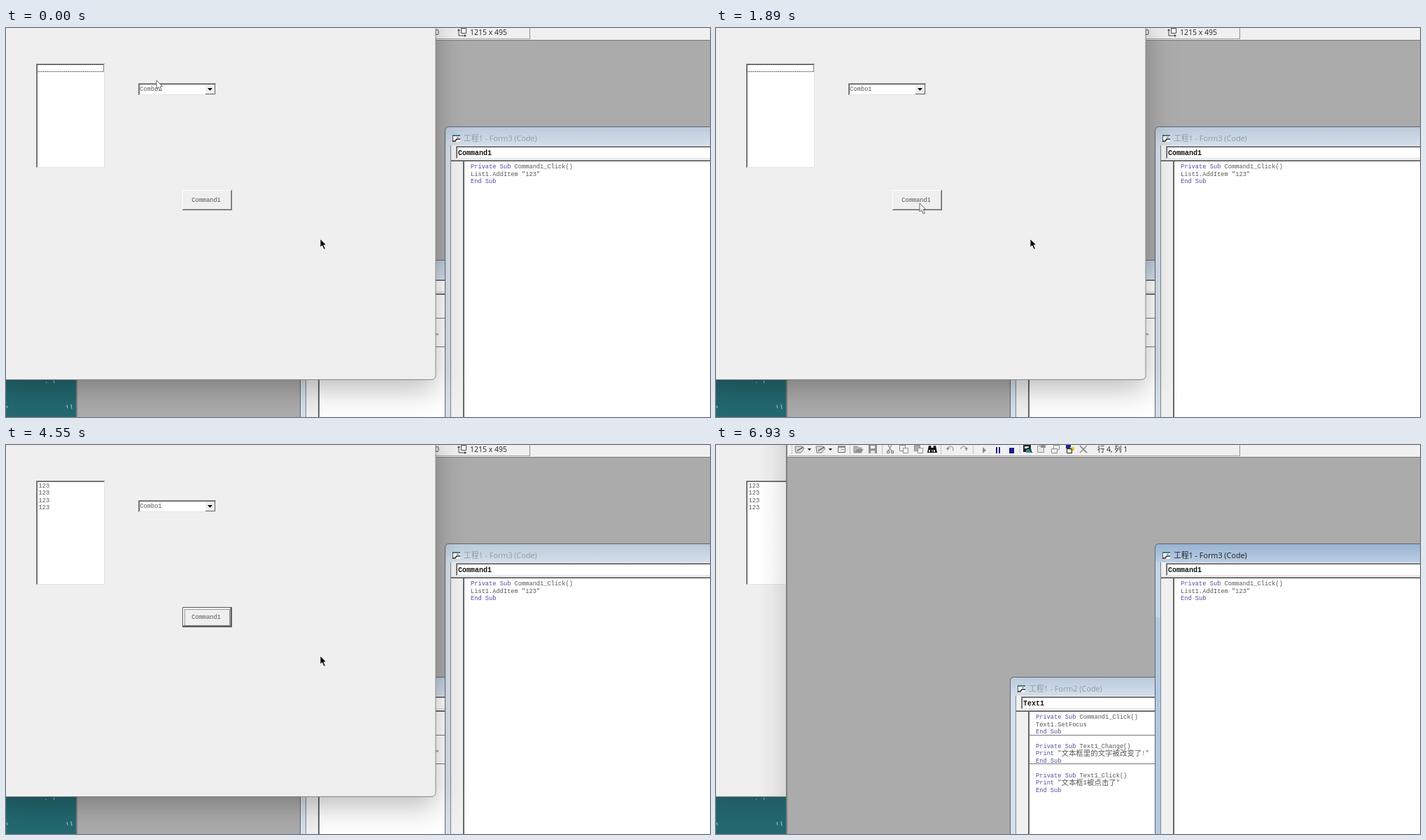
An HTML page with a canvas for the animation above (7 s loop, 1006 by 557 pixels).

```html
<!DOCTYPE html>
<html lang="zh">
<head>
<meta charset="utf-8">
<title>List demo</title>
<style>
  html, body { margin: 0; width: 100%; height: 100%; overflow: hidden; background: #ababab; }
  canvas { display: block; }
</style>
</head>
<body>
<canvas id="stage" width="1006" height="557"></canvas>
<script>
const g = document.getElementById('stage').getContext('2d');
const W = 1006, H = 557, LOOP = 7000, STEP = 70;
const FOCUS = 2030, ADDS = [2100, 3010, 3430, 3850];
const SWITCH = 5250, POINTER_OFF = 5880, BLINK = 560;
const CJK = '"Noto Sans CJK SC", "Noto Sans CJK", sans-serif';
const MONO = '"Liberation Mono", monospace';
const UI = '"Open Sans", ' + CJK;
const LINE = 10.44;

// Pointer path: time, x, y
const PATH = [
  [0, 215, 75], [210, 215, 75], [420, 140, 62], [560, 80, 60], [700, 66, 120],
  [840, 90, 170], [1050, 149, 123], [1750, 291, 251], [1960, 291, 251],
  [2100, 291, 250], [4060, 291, 250], [4550, 525, 560]
];

function box(color, x, y, w, h) {
  g.fillStyle = color;
  g.fillRect(x, y, w, h);
}

function outline(color, x, y, w, h, dash = []) {
  g.strokeStyle = color;
  g.lineWidth = 1;
  g.setLineDash(dash);
  g.strokeRect(x + .5, y + .5, w - 1, h - 1);
  g.setLineDash([]);
}

function poly(points, fill, stroke, width = 1) {
  g.beginPath();
  points.forEach(([x, y]) => g.lineTo(x, y));
  if (fill) { g.closePath(); g.fillStyle = fill; g.fill(); }
  if (stroke) { g.strokeStyle = stroke; g.lineWidth = width; g.stroke(); }
}

function fade(x0, y0, x1, y1, ...colors) {
  const f = g.createLinearGradient(x0, y0, x1, y1);
  colors.forEach((c, i) => f.addColorStop(i / (colors.length - 1), c));
  return f;
}

function label(text, x, y, font, color, align = 'left') {
  g.font = font;
  g.fillStyle = color;
  g.textAlign = align;
  g.fillText(text, x, y);
}

// Half-width Latin and full-width Chinese on one grid, y is the line's middle
function code(text, x, y) {
  for (const run of text.match(/[\u4e00-\u9fff]+|\w+|[^\w\u4e00-\u9fff]+/g)) {
    const wide = /[\u4e00-\u9fff]/.test(run);
    const key = /^(Private|Sub|End|Print)$/.test(run);
    label(run, x, y + (wide ? 3.7 : 3), wide ? '300 ' + LINE + 'px ' + CJK : '8.7px ' + MONO, key ? '#4c4ca4' : '#555');
    x += g.measureText(run).width;
  }
}

function sunken(x, y, w, h) {
  box('#fff', x, y, w, h);
  box('#8c8c8c', x, y, w, 1);
  box('#8c8c8c', x, y, 1, h);
  box('#5c5c5c', x + 1, y + 1, w - 2, 1);
  box('#5c5c5c', x + 1, y + 1, 1, h - 2);
  box('#e3e3e3', x + 1, y + h - 1, w - 1, 1);
  box('#e3e3e3', x + w - 1, y + 1, 1, h - 1);
}

function arrow(x, y, fill, edge) {
  const shape = [[0, 0], [0, 12], [2.8, 9.6], [5.2, 15], [7.4, 14], [5, 8.9], [8.6, 8.6]];
  g.lineJoin = 'round';
  const pts = shape.map(([a, b]) => [x + a, y + b]);
  poly([...pts, pts[0]], fill, edge, .9);
}

function codeWindow(x, y, name, item, lines, active) {
  const w = 620, h = 500;
  g.beginPath();
  g.roundRect(x - .5, y - .5, w, h, 5);
  g.fillStyle = active ? fade(0, y, 0, y + 28, '#98b3d2', '#bccfe5') : fade(0, y, 0, y + 28, '#bccada', '#d5e0ec');
  g.fill();
  g.strokeStyle = '#5f666e';
  g.lineWidth = 1;
  g.stroke();
  if (active) {
    box('#c4d5e9', x, y + 26, 7, 79);
    box('#b2c9e3', x, y + 105, 7, h);
  }
  box('#f0f0f0', x + 8, y + 26, w, h);
  box('#7d858d', x + 7, y + 26, 1, h);

  box('#fff', x + 10, y + 11, 11, 10);
  box('#2b8585', x + 10, y + 11, 11, 2);
  box('#555', x + 10, y + 11, 1, 10);
  box('#b53a3a', x + 16, y + 14, 3, 1);
  poly([[x + 10, y + 20], [x + 14, y + 20], [x + 16, y + 17], [x + 21, y + 17]], null, '#222', 1.4);
  label('工程1 - ' + name + ' (Code)', x + 26, y + 20, '10.8px ' + UI, active ? '#1c1c1c' : '#929aa3');

  sunken(x + 15, y + 27, w, 18);
  label(item, x + 18, y + 39.5, 'bold 10px ' + MONO, '#111');
  box('#858585', x + 8, y + 47, w, 1);
  box('#5c5c5c', x + 8, y + 48, w, 1);
  box('#f0f0f0', x + 8, y + 49, 18, h);
  box('#fff', x + 27, y + 49, w, h);
  box('#666', x + 25, y + 49, 2, h);
  lines.forEach((s, i) => {
    if (s) code(s, x + 36, y + 56.2 + i * LINE);
    else box('#777', x + 26, Math.round(y + 50.2 + i * LINE), w, 1);
  });
}

function toolIcons() {
  const gray = '#909090', dark = '#666', navy = '#1a1a8c';
  for (let i = 0; i < 2; i++) {
    const x = 113 + i * 30;
    poly([[x, 2], [x + 10, 2], [x + 13, 5], [x + 8, 11], [x + 1, 11], [x, 2]], '#ddd', '#777');
    poly([[x + 3, 8], [x + 12, 3]], null, dark, 1.5);
    poly([[x + 18, 5], [x + 23, 5], [x + 20.5, 8]], '#111');
  }
  outline(dark, 174, 1, 11, 10);
  box(gray, 174, 1, 11, 3);
  box(gray, 178, 6, 5, 1);
  for (const x of [108, 191, 237, 321, 367, 434]) box('#c4c4c4', x, 0, 1, 13);
  poly([[197, 11], [197, 2], [202, 2], [203, 4], [208, 4], [208, 11]], '#b4b4b4', gray);
  poly([[198, 11], [201, 6], [211, 6], [207, 11]], gray);
  box(gray, 218, 0, 12, 12);
  box('#f0f0f0', 221, 1, 6, 4);
  box('#e0e0e0', 221, 8, 6, 4);
  poly([[246, 0], [251, 9]], null, dark);
  poly([[251, 0], [246, 9]], null, dark);
  outline(dark, 244, 8, 4, 4);
  outline(dark, 250, 8, 4, 4);
  for (const x of [262, 283]) {
    box(x > 270 ? '#aaa' : '#eee', x, 0, 8, 9);
    outline(gray, x, 0, 9, 9);
    box('#f2f2f2', x + 5, 4, 8, 8);
    outline(gray, x + 5, 4, 8, 8);
  }
  for (const x of [303, 310]) {
    poly([[x + 1, 1], [x + 4, 1], [x + 6, 11], [x - 1, 11]], '#111');
    box('#ddd', x + 1, 7, 2, 3);
  }
  box('#111', 306, 4, 6, 3);
  for (const [x, d] of [[329, 1], [360, -1]]) {
    g.beginPath();
    g.arc(x + 6 * d, 6, 4, Math.PI, .6, false);
    g.strokeStyle = gray;
    g.lineWidth = 1.2;
    g.stroke();
    poly([[x, 4], [x + 5 * d, 4], [x + 2 * d, 8]], gray);
  }
  poly([[381, 3], [386, 7.5], [381, 12]], '#8b8b9a');
  box(navy, 400, 3, 2, 9);
  box(navy, 404, 3, 2, 9);
  box(navy, 419, 4, 7, 8);
  box('#202828', 439, 0, 11, 10);
  box('#e4e4e4', 441, 2, 6, 3);
  box('#3a8a8a', 443, 6, 8, 5);
  poly([[439, 10], [446, 4], [452, 11]], null, '#111');
  box('#e8e8e8', 459, 1, 10, 10);
  outline(gray, 459, 1, 10, 10);
  box(gray, 464, 0, 7, 4);
  outline(gray, 482, 0, 9, 7);
  box('#eee', 479, 5, 9, 6);
  outline(gray, 479, 5, 9, 7);
  box('#20209a', 500, 0, 7, 5);
  box('#e6c832', 506, 3, 6, 5);
  outline('#222', 501, 5, 8, 7);
  poly([[520, 1], [530, 11]], null, gray, 2);
  poly([[530, 1], [520, 11]], null, gray, 1.6);
}

function ide(active) {
  box('#ababab', 101, 0, W, H);
  box('#f0f0f0', 101, 0, W, 17);
  box('#a0a0a0', 104, 15, 645, 1);
  box('#8e8e8e', 748, 0, 1, 16);
  box('#777', 101, 17, W, 1);
  box('#7c7c7c', 100, 0, 2, H);
  if (active) {
    toolIcons();
    label('行 4, 列 1', 545, 10, '10.4px ' + UI, '#222');
  } else {
    label('0, 0', 619, 10, '10.5px ' + UI, '#333', 'right');
    outline('#444', 650, 0, 8, 8);
    box('#fff', 651, 1, 6, 6);
    poly([[647, 2], [647, 11], [657, 11]], null, '#444');
    poly([[645, 4], [647, 1], [649, 4]], '#444');
    poly([[655, 9], [658, 11], [655, 13]], '#444');
    label('1215 x 495', 663, 10, '10.5px ' + UI, '#222');
  }
  codeWindow(421, 333, 'Form2', 'Text1', [
    'Private Sub Command1_Click()', 'Text1.SetFocus', 'End Sub', '',
    'Private Sub Text1_Change()', 'Print "文本框里的文字被改变了!"', 'End Sub', '',
    'Private Sub Text1_Click()', 'Print "文本框1被点击了"', 'End Sub'
  ], false);
  codeWindow(628, 142, 'Form3', 'Command1',
    ['Private Sub Command1_Click()', 'List1.AddItem "123"', 'End Sub'], active);
}

function desktop() {
  box('#236870', 0, 490, 102, 67);
  g.lineCap = 'round';
  for (const [x, y, h] of [[68, 505, 3], [57, 507, 1], [87, 540, 4], [93, 539, 6], [1, 541, 3]])
    poly([[x, y], [x + 1, y + h]], null, '#b9d3d4', 1);
  g.lineCap = 'butt';
}

function form(t) {
  g.save();
  g.shadowColor = t < SWITCH ? 'rgba(0,0,0,.27)' : 'rgba(0,0,0,.15)';
  g.shadowBlur = 42;
  g.shadowOffsetY = 13;
  g.beginPath();
  g.roundRect(-20, -20, 634, 523.5, 6);
  g.fillStyle = '#efefef';
  g.fill();
  g.restore();
  g.strokeStyle = '#868686';
  g.lineWidth = 1;
  g.stroke();

  const focused = t >= FOCUS;
  sunken(43, 51, 98, 149);
  if (!focused) outline('#555', 44, 52, 96, 11, [1, .5]);
  ADDS.forEach((at, i) => { if (t >= at) code('123', 46.6, 58 + i * LINE); });

  sunken(189, 79, 111, 17);
  code('Combo1', 191.3, 87);
  box('#efefef', 285, 81, 14, 14);
  box('#666', 298, 81, 1, 14);
  box('#666', 285, 94, 14, 1);
  poly([[288, 86], [295, 86], [291.5, 89.7]], '#000');

  const d = focused ? 1 : 0;
  box('#efefef', 252, 232, 71, 29);
  box('#fff', 252 + d, 232 + d, 70 - d, 1);
  box('#fff', 252 + d, 232 + d, 1, 28 - d);
  box('#a0a0a0', 253, 259 - d, 69 - d, 1);
  box('#a0a0a0', 321 - d, 233, 1, 27 - d);
  box('#666', 252, 260 - d, 71, 1);
  box('#666', 322 - d, 232, 1, 29);
  if (focused) {
    outline('#555', 252, 232, 71, 29);
    outline('#444', 255, 235, 65, 24, [1, 1]);
  }
  code('Command1', 265.3, 246);
}

function pointer(t) {
  const i = PATH.findIndex(p => p[0] > t);
  if (i < 1) return;
  const [t0, x0, y0] = PATH[i - 1], [t1, x1, y1] = PATH[i];
  const k = (t - t0) / (t1 - t0);
  arrow(x0 + (x1 - x0) * k, y0 + (y1 - y0) * k, '#fff', '#555');
}

function draw(t) {
  g.clearRect(0, 0, W, H);
  desktop();
  if (t < SWITCH) {
    ide(false);
    form(t);
    pointer(t);
  } else {
    form(t);
    box(fade(60, 0, 101, 0, 'rgba(0,0,0,0)', 'rgba(0,0,0,.03)', 'rgba(0,0,0,.1)'), 60, 0, 41, 503);
    ide(true);
    if (Math.floor((t - SWITCH) / BLINK) % 2 === 0) box('#222', 664, 224, 1, 11);
  }
  if (t < POINTER_OFF) arrow(449, 302, '#000', '#f4f4f4');
}

const start = performance.now();
function tick() {
  const t = (performance.now() - start) % LOOP;
  draw(Math.floor(t / STEP) * STEP);
  requestAnimationFrame(tick);
}
tick();
</script>
</body>
</html>
```
